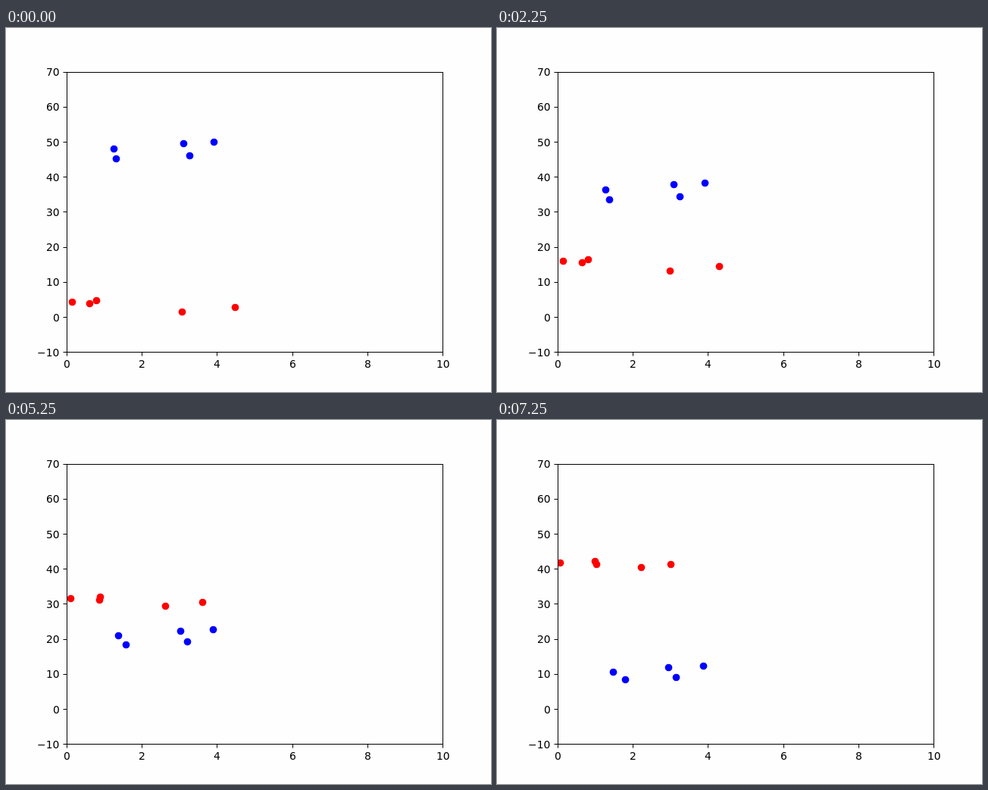
An HTML page for the animation above (7500 ms loop, 640 px wide and 480 px high).

```html
<!DOCTYPE html>
<html lang="en">
<head>
<meta charset="utf-8">
<title>Two groups crossing</title>
<style>
  html, body { margin: 0; width: 100%; height: 100%; overflow: hidden; background: #fefefe; }
  svg { display: block; width: 640px; height: 480px; }
  text { font: 13.89px "DejaVu Sans", sans-serif; }
  .line { stroke: #000; stroke-width: 1; fill: none; }
</style>
</head>
<body>
<svg viewBox="0 0 640 480">
  <defs><clipPath id="plot"><rect x="80" y="58" width="496" height="369"/></clipPath></defs>
  <rect width="640" height="480" fill="#fefefe"/>
  <g id="dots" clip-path="url(#plot)"></g>
  <g id="axes"></g>
</svg>
<script>
const STEP = 250, STEPS = 30, SPEED = 6;
const DIGIT = 8.84, MINUS = 11.64;
const axes = document.getElementById('axes');
const layer = document.getElementById('dots');

function add(parent, tag, attrs, text) {
  const el = document.createElementNS('http://www.w3.org/2000/svg', tag);
  for (const name in attrs) el.setAttribute(name, attrs[name]);
  if (text !== undefined) el.textContent = text;
  parent.appendChild(el);
  return el;
}

// Labels start on whole pixels; align is 0.5 for centred, 1 for right-aligned.
function label(value, x, y, align) {
  const digits = String(Math.abs(value)).length;
  const width = digits * DIGIT + (value < 0 ? MINUS : 0);
  add(axes, 'text', { x: Math.ceil(x - width * align), y }, String(value).replace('-', '\u2212'));
}

function drawAxes() {
  add(axes, 'rect', { class: 'line', x: 80.5, y: 58.5, width: 496, height: 369 });
  for (let v = 0; v <= 10; v += 2) {
    const x = 80 + v * 49.6;
    add(axes, 'path', { class: 'line', d: `M${snap(x)} 427.5v5` });
    label(v, x, 448, 0.5);
  }
  for (let v = -10; v <= 70; v += 10) {
    const y = 381 - v * 4.62;
    add(axes, 'path', { class: 'line', d: `M75.5 ${snap(y)}h5` });
    label(v, 70.3, Math.round(y + 5.55), 1);
  }
}

const snap = v => Math.round(v) + 0.5;

// x, y: start; drift: sideways shift over the loop;
// bend: vertical acceleration; early: how much of the drift comes sooner
function dot(fill, dir, x, y, drift, bend = 0, early = 0) {
  const el = add(layer, 'circle', { r: 4.86, fill });
  return k => {
    const t = k / (STEPS - 1);
    el.setAttribute('cx', snap(x + drift * t * t * (1 + early * (1 - t))));
    el.setAttribute('cy', snap(y + dir * (SPEED * k + bend * k * k)));
  };
}
const red = (...args) => dot('#f00', -1, ...args);
const blue = (...args) => dot('#00f', 1, ...args);

const dots = [
  red(87, 361, -4, -0.0008, 0.4),
  red(109.6, 363, 21.2, -0.0008, 0.6),
  red(119, 359, 10, -0.0008),
  red(232, 374.15, -42, 0.007),
  red(302, 368.4, -73, 0.0053, 0.4),
  blue(142, 159, 11, -0.0012),
  blue(145.4, 172, 24, -0.0048),
  blue(234.2, 152, -8),
  blue(242, 168, -6, -0.0036),
  blue(274.2, 150, -2)
];

function render(ms) {
  const k = Math.floor(ms / STEP) % STEPS;
  for (const move of dots) move(k);
}

drawAxes();
render(0);
let start;
function tick(now) {
  if (start === undefined) start = now;
  render(now - start);
  requestAnimationFrame(tick);
}
requestAnimationFrame(tick);
</script>
</body>
</html>
```
